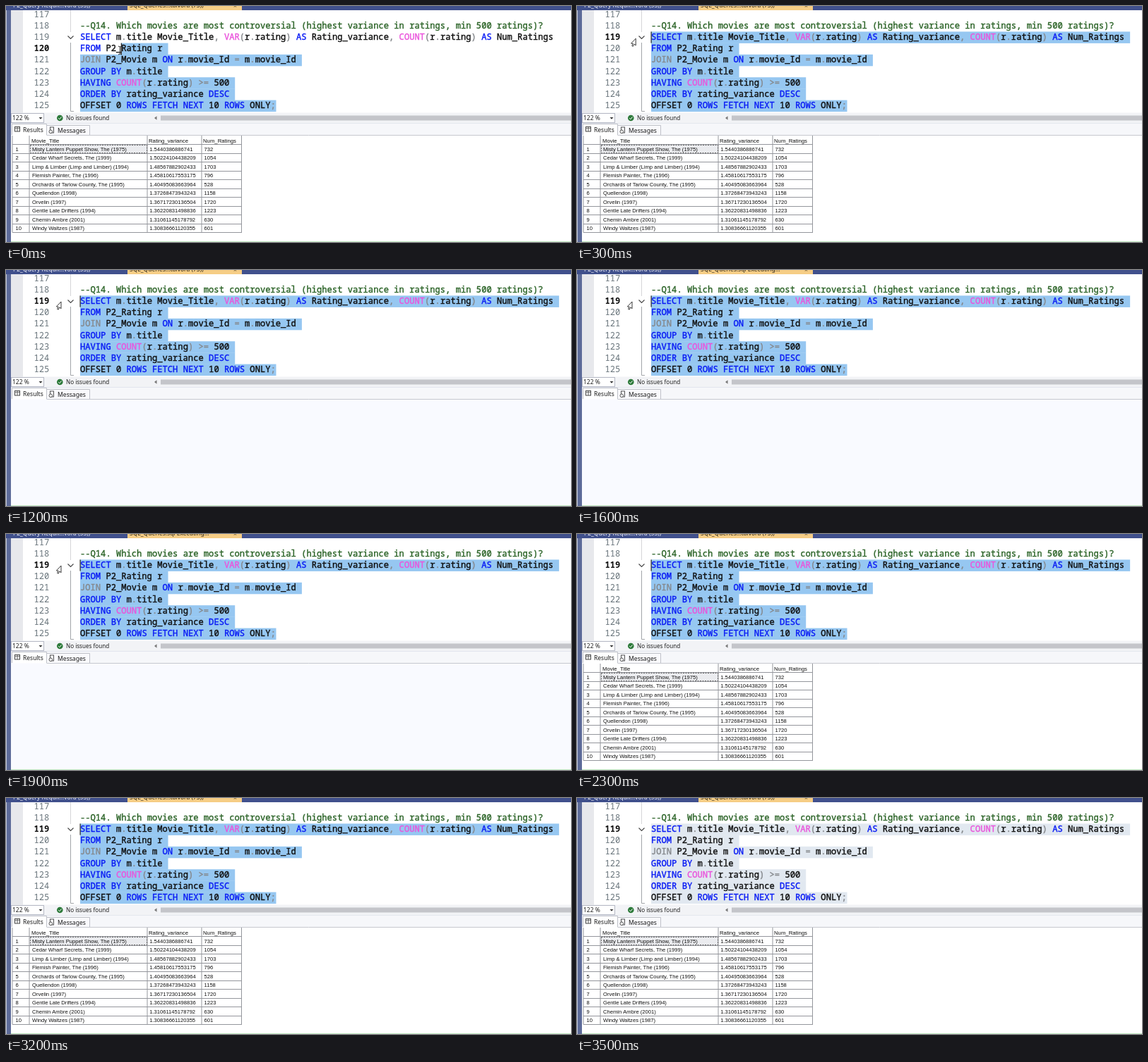
Recreate the animation shown at these times as an HTML page with a canvas. Size 800x335 px, loop 3600 ms.

```html
<!DOCTYPE html>
<html lang="en">
<head>
<meta charset="utf-8">
<title>Query editor</title>
<style>
html, body { margin: 0; width: 100%; height: 100%; overflow: hidden; background: #fff; }
canvas { display: block; width: 800px; height: 335px; }
</style>
</head>
<body>
<canvas id="stage" width="800" height="335"></canvas>
<script>
const ctx = document.getElementById('stage').getContext('2d');
const LOOP = 3600, STEP = 100;
const MONO = '"Noto Sans Mono", "DejaVu Sans Mono", monospace';
const UI = '"Noto Sans", "Open Sans", sans-serif';
const GRID = '"Liberation Sans", Arial, sans-serif';
const CODE_X = 105, CHAR_W = 7.284, LINE_H = 16.2, FIRST = 119;

const comment = '--Q14. Which movies are most controversial (highest variance in ratings, min 500 ratings)?';
const code = [
  'SELECT m.title Movie_Title, VAR(r.rating) AS Rating_variance, COUNT(r.rating) AS Num_Ratings',
  'FROM P2_Rating r',
  'JOIN P2_Movie m ON r.movie_Id = m.movie_Id',
  'GROUP BY m.title',
  'HAVING COUNT(r.rating) >= 500',
  'ORDER BY rating_variance DESC',
  'OFFSET 0 ROWS FETCH NEXT 10 ROWS ONLY;'
];
const keywords = /^(SELECT|AS|FROM|ON|GROUP|BY|HAVING|ORDER|DESC|ROWS|FETCH|NEXT)$/;

const results = [
  ['Misty Lantern Puppet Show, The (1975)', '1.5440386886741', '732'],
  ['Cedar Wharf Secrets, The (1999)', '1.50224104438209', '1054'],
  ['Limp & Limber (Limp and Limber) (1994)', '1.48567882902433', '1703'],
  ['Flemish Painter, The (1996)', '1.45810617553175', '796'],
  ['Orchards of Tarlow County, The (1995)', '1.40495083663964', '528'],
  ['Quellendon (1998)', '1.37268473943243', '1158'],
  ['Orvelin (1997)', '1.36717230136504', '1720'],
  ['Gentle Late Drifters (1994)', '1.36220831498836', '1223'],
  ['Chemin Ambre (2001)', '1.31061145178792', '630'],
  ['Windy Waltzes (1987)', '1.30836661120355', '601']
];

function rect(x, y, w, h, color) {
  ctx.fillStyle = color;
  ctx.fillRect(x, y, w, h);
}

function text(str, x, y, font, color, weight = 0) {
  ctx.font = font;
  ctx.fillStyle = color;
  ctx.fillText(str, x, y);
  if (weight) {
    ctx.strokeStyle = color;
    ctx.lineWidth = weight;
    ctx.strokeText(str, x, y);
  }
}

function path(points, color, width = 1, fill) {
  ctx.beginPath();
  points.forEach(([x, y], i) => i ? ctx.lineTo(x, y) : ctx.moveTo(x, y));
  if (fill) {
    ctx.closePath();
    ctx.fillStyle = fill;
    ctx.fill();
  }
  if (color) {
    ctx.strokeStyle = color;
    ctx.lineWidth = width;
    ctx.stroke();
  }
}

const baseline = row => 48 + row * LINE_H;
const lineTop = row => 36.4 + row * LINE_H;

function tokenColor(word) {
  if (/^(VAR|COUNT)$/.test(word)) return '#ea55dc';
  if (keywords.test(word)) return '#0a1cf5';
  return word === 'JOIN' || /^\W/.test(word) ? '#85888c' : '#111';
}

function drawWords(str, row, pattern, pick) {
  for (const m of str.matchAll(pattern))
    text(m[0], CODE_X + m.index * CHAR_W, baseline(row), '12.14px ' + MONO, pick(m[0]), 0.4);
}

function drawTabs(running) {
  rect(0, 0, 800, 6, '#40508c');
  rect(172, 0, 162, 6, '#f6cd85');
  text('P2_Query Requir...vora (53))', 10, 2.3, '8.5px ' + UI, '#f4f5fb');
  text(running ? 'SQL_Queries.sql Executing...' : 'SQL_Queries...talvora (73))*', 175, 2.3, '8.5px ' + UI, '#2a2418');
  text('×', 322, 3, '8.5px ' + UI, '#5c4a28');
}

function drawEditor(sel, focused) {
  rect(7, 6, 793, 146, '#fff');
  rect(7, 6, 17, 146, '#e7e8ec');
  for (let row = sel.row; row < code.length; row++) {
    const from = row === sel.row ? sel.col : 0;
    const to = code[row].length + (row < code.length - 1 ? 1 : 0);
    rect(CODE_X + from * CHAR_W, lineTop(row), (to - from) * CHAR_W + 0.7, LINE_H + 0.3, focused ? '#96c7f1' : '#e1e8f0');
  }
  for (let row = -2; row < code.length; row++) {
    const now = row === sel.row;
    text(String(FIRST + row), 39.5, baseline(row), (now ? '700' : '400') + ' 12.14px ' + MONO, now ? '#111' : '#68747b');
  }
  drawWords(comment, -1, /\S+/g, () => '#2c6428');
  code.forEach((line, row) => drawWords(line, row, /\w+|[^\w\s]+/g, tokenColor));
  path([[91.5, 6], [91.5, 37]], '#d5d5d8');
  path([[91.5, 52], [91.5, 149.5], [96, 149.5]], '#a2a5a9');
  path([[87.5, 42.5], [91.5, 46.5], [95.5, 42.5]], '#444', 1.1);
  if (focused) rect(CODE_X - 0.5 + sel.col * CHAR_W, lineTop(sel.row), 1.2, LINE_H, '#222');
}

function drawStatus() {
  rect(7, 151.5, 793, 15, '#f2f3f6');
  rect(8, 153, 46, 12.5, '#fff');
  ctx.strokeStyle = '#b5b8c4';
  ctx.lineWidth = 1;
  ctx.strokeRect(7.5, 152.5, 46, 13);
  text('122 %', 9, 162.3, '8.5px ' + UI, '#222');
  path([[46.5, 158], [51.5, 158], [49, 160.8]], null, 0, '#333');
  ctx.beginPath();
  ctx.arc(76.3, 159, 4.3, 0, 7);
  ctx.fillStyle = '#2d7a3a';
  ctx.fill();
  path([[74.2, 159.2], [75.8, 160.8], [78.5, 157.4]], '#fff', 1);
  text('No issues found', 85, 162.3, '8.1px ' + UI, '#222');
  path([[213.5, 156.3], [213.5, 161.7], [210, 159]], null, 0, '#777');
  rect(219, 155.5, 581, 7, '#c4c5ca');
}

function drawPaneTabs(filled) {
  rect(7, 166.5, 793, 168.5, filled ? '#fff' : '#f9faff');
  rect(7, 166.5, 793, 16.5, '#f6f7fa');
  rect(9, 167, 48, 16.5, '#fff');
  rect(58, 169, 60, 14, '#f9f9fc');
  path([[8.5, 183], [8.5, 167.5], [57.5, 167.5], [57.5, 183]], '#bfc1c8');
  path([[57.5, 169.5], [118.5, 169.5], [118.5, 183]], '#bfc1c8');
  path([[57.5, 183.5], [800, 183.5]], '#c6c8cf');
  ctx.strokeStyle = '#444';
  ctx.strokeRect(12.5, 171.5, 7, 6.5);
  path([[12.5, 173.8], [19.5, 173.8]], '#444', 0.8);
  path([[16, 171.5], [16, 178]], '#444', 0.8);
  text('Results', 24, 178.8, '8.5px ' + UI, '#1c1c1c');
  ctx.strokeStyle = '#444';
  ctx.lineWidth = 0.9;
  ctx.strokeRect(62.5, 172, 5, 8);
  ctx.beginPath();
  ctx.arc(63.3, 178.3, 2.3, 0, 7);
  ctx.fillStyle = '#fff';
  ctx.fill();
  ctx.stroke();
  text('Messages', 73, 180.3, '8.6px ' + UI, '#1c1c1c');
  rect(7, 334, 793, 1, '#bfe8c0');
}

function drawResults() {
  const rowH = 12.52, top = 196, bottom = top + rowH * 10;
  const cols = [9, 33, 200, 277, 333.5];
  rect(9, 184, 325, bottom - 184, '#fff');
  rect(34, top, 166, rowH, '#ebecef');
  for (const x of cols) path([[x, 184], [x, bottom]], '#94969c');
  for (let i = 0; i <= 10; i++) {
    const y = Math.round(top + i * rowH) + 0.5;
    path([[9, y], [334, y]], '#94969c');
  }
  ctx.setLineDash([2, 1.5]);
  ctx.strokeStyle = '#555';
  ctx.lineWidth = 0.9;
  ctx.strokeRect(34.5, 197.5, 165, 11);
  ctx.setLineDash([]);
  ['Movie_Title', 'Rating_variance', 'Num_Ratings'].forEach((name, i) =>
    text(name, [36, 202, 279][i], 193.7, '7.75px ' + GRID, '#111'));
  results.forEach((row, i) => {
    const y = 205.8 + i * rowH;
    text(String(i + 1), 13.5, y, '7.6px ' + GRID, '#111');
    row.forEach((cell, j) => text(cell, [37, 203.2, 280.5][j], y, '7.6px ' + GRID, '#111'));
  });
}

function drawPointer(x, y) {
  if (x > 96) {
    path([[x - 2.5, y - 6], [x, y - 5], [x + 2.5, y - 6]], '#222');
    path([[x, y - 5], [x, y + 5]], '#222');
    path([[x - 2.5, y + 6], [x, y + 5], [x + 2.5, y + 6]], '#222');
    return;
  }
  const arrow = [[0, 0], [0, 9.8], [-2.1, 8], [-3.9, 11.2], [-5.4, 10.4], [-3.8, 7.3], [-6.6, 7]];
  path([...arrow, arrow[0]].map(([dx, dy]) => [x + dx, y + dy]), '#222', 0.9, '#fff');
}

function draw(t) {
  // The pointer drags the selection up and into the margin.
  const p = 1 - Math.pow(1 - Math.min(t / 400, 1), 2);
  const px = 161.5 - 83.5 * p, py = 63 - 18 * p;
  const sel = {
    row: py < lineTop(1) ? 0 : 1,
    col: Math.max(0, Math.round((px - CODE_X) / CHAR_W))
  };
  const filled = t < 1100 || t >= 2200;
  rect(0, 0, 800, 335, '#5d6b99');
  rect(0, 6, 1, 329, '#c5cbdd');
  drawTabs(t >= 1300 && t < 2200);
  drawEditor(sel, t < 3300);
  drawStatus();
  drawPaneTabs(filled);
  if (filled) drawResults();
  if (t < 2200) drawPointer(px, py);
}

const start = performance.now();
function frame(now) {
  const t = Math.max(0, now - start) % LOOP;
  draw(Math.floor(t / STEP) * STEP);
  requestAnimationFrame(frame);
}
draw(0);
requestAnimationFrame(frame);
</script>
</body>
</html>
```
